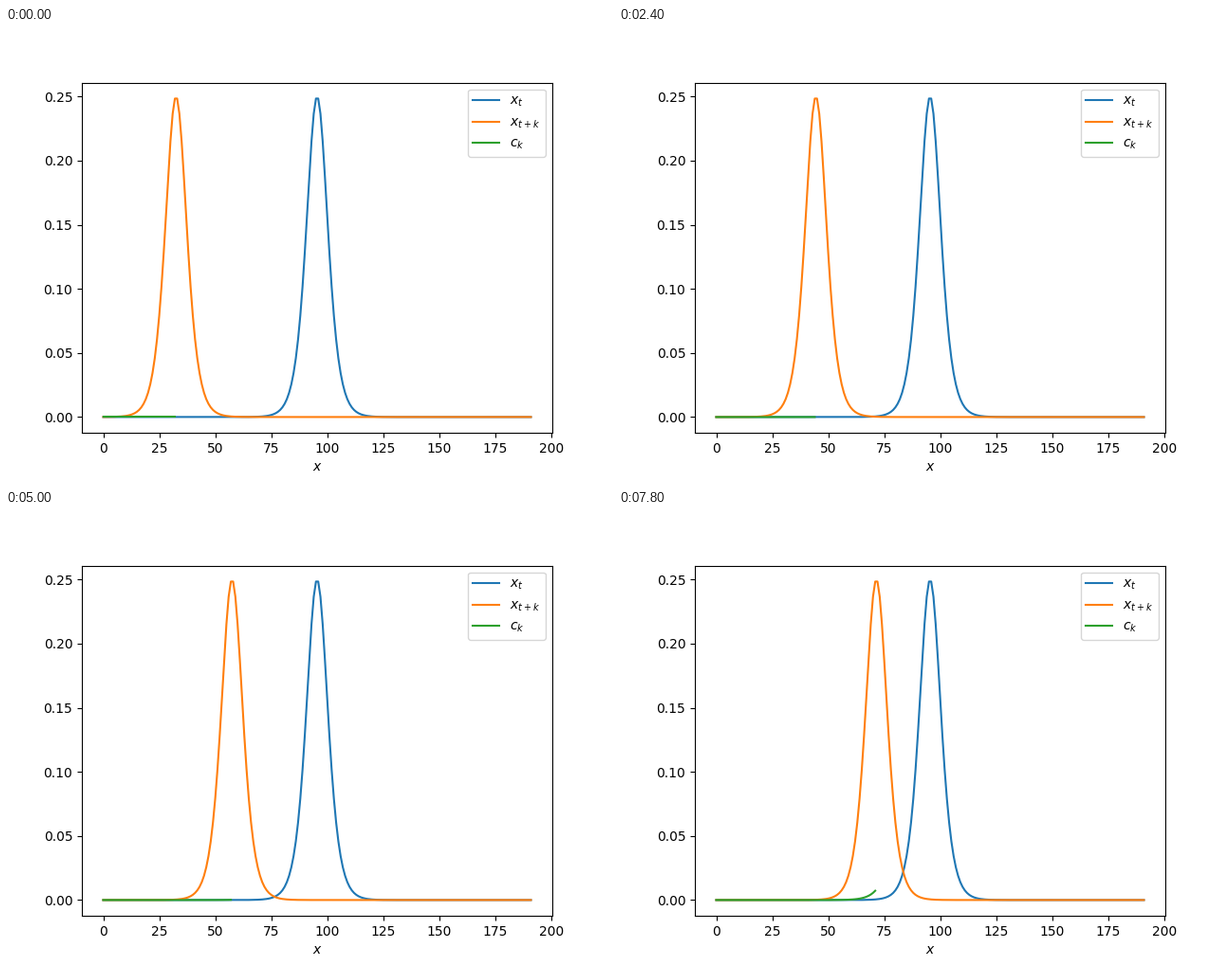
Recreate the animation shown at these times as a matplotlib script. Size 640 by 480 pixels, loop 8000 ms.

```python
import numpy as np
import matplotlib.pyplot as plt
from matplotlib.animation import FuncAnimation

N = 192
FIRST = 33
FRAMES = 40

pos = np.arange(N)
z = np.linspace(-30, 30, N)
pulse = 0.25 / np.cosh(z / 2) ** 2


def shifted(k):
    """Pulse moved so that k = N // 2 is its resting place."""
    return np.roll(pulse, k - N // 2)


corr = np.array([pulse @ shifted(k) for k in range(N)])

fig, ax = plt.subplots(figsize=(6.4, 4.8), dpi=100)
ax.plot(pos, pulse, label="$x_t$")
moving, = ax.plot(pos, shifted(FIRST), label="$x_{t+k}$")
trace, = ax.plot([], [], label="$c_k$")
ax.set_xlabel("$x$")
ax.legend(loc="upper right")


def update(frame):
    k = FIRST + frame
    moving.set_ydata(shifted(k))
    trace.set_data(pos[:k], corr[:k])
    return moving, trace


anim = FuncAnimation(fig, update, frames=FRAMES, interval=200,
                     repeat=True, repeat_delay=0)
plt.show()
```
